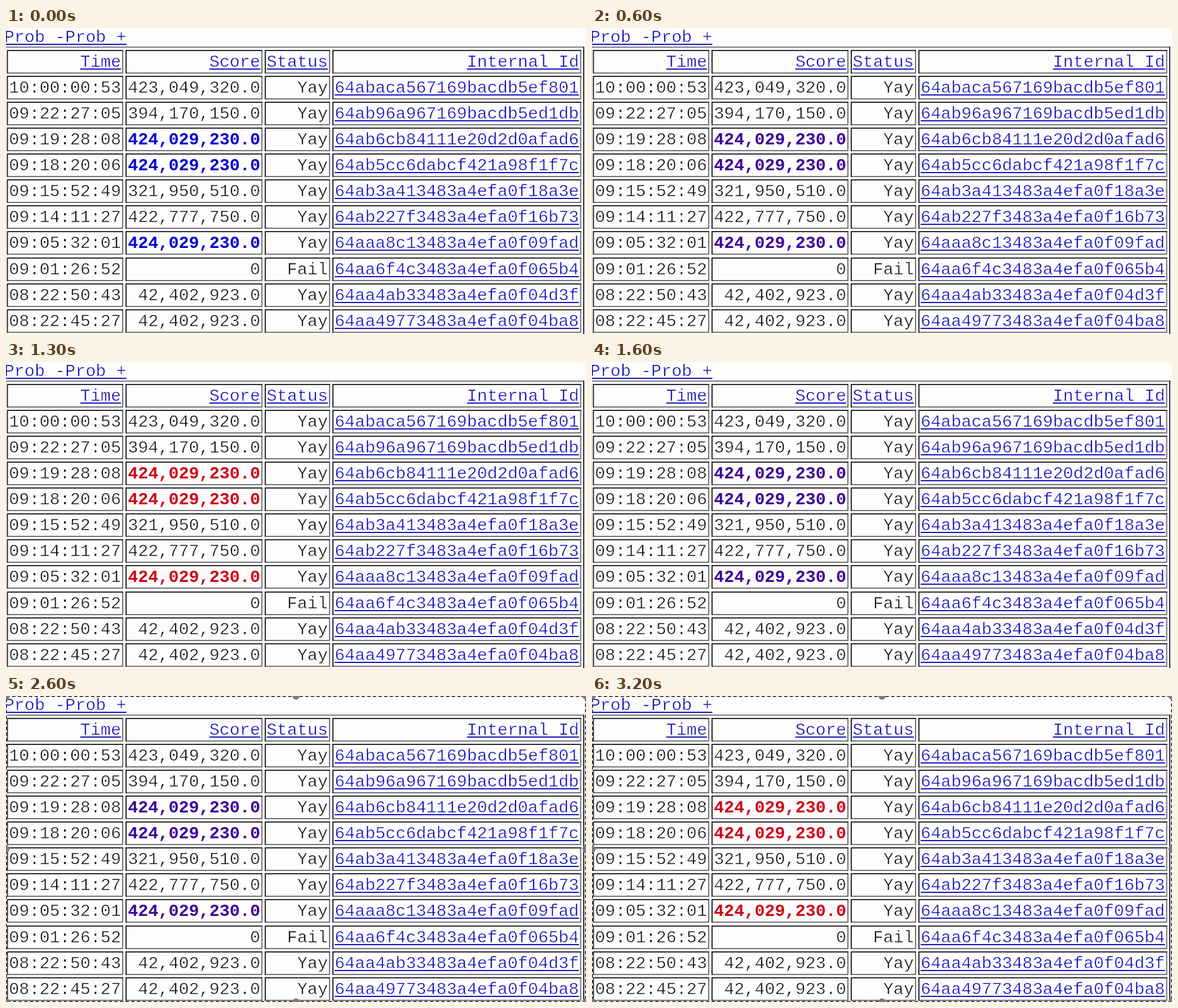
Write an HTML page that moves like this. It is 1029 by 544 pixels and loops after 3.3 s.

```html
<!DOCTYPE html>
<html lang="en">
<head>
<meta charset="utf-8">
<title>Score table</title>
<style>
html, body { margin: 0; width: 100%; height: 100%; overflow: hidden; background: #fdfdfc; }
svg { display: block; }
text { font: 30.1px "Liberation Mono", monospace; fill: #101014; white-space: pre; }
/* A background-coloured outline thins the regular weight */
text:not(.best) { stroke: #fdfdfc; stroke-width: 0.6px; }
.link { fill: #0c0cbc; }
.best { font-weight: bold; fill: var(--pulse); }
</style>
</head>
<body>
<svg id="stage" width="1029" height="544" viewBox="0 0 1029 544">
  <g id="table"></g>
  <g id="selection" visibility="hidden">
    <rect x="0.75" y="0.75" width="1027.5" height="542.5" fill="none" stroke="#fff" stroke-width="1.5"/>
    <rect x="0.75" y="0.75" width="1027.5" height="542.5" fill="none" stroke="#111" stroke-width="1.5" stroke-dasharray="6 4"/>
  </g>
</svg>
<script>
const ADVANCE = 18.063, PITCH = 46.12;
const BEST = "424,029,230.0";
const columns = [[1.5, 208], [212, 455], [459, 575], [579, 1020.5]];
const rows = [
  "Time|Score|Status|Internal Id",
  "10:00:00:53|423,049,320.0|Yay|64abaca567169bacdb5ef801",
  "09:22:27:05|394,170,150.0|Yay|64ab96a967169bacdb5ed1db",
  `09:19:28:08|${BEST}|Yay|64ab6cb84111e20d2d0afad6`,
  `09:18:20:06|${BEST}|Yay|64ab5cc6dabcf421a98f1f7c`,
  "09:15:52:49|321,950,510.0|Yay|64ab3a413483a4efa0f18a3e",
  "09:14:11:27|422,777,750.0|Yay|64ab227f3483a4efa0f16b73",
  `09:05:32:01|${BEST}|Yay|64aaa8c13483a4efa0f09fad`,
  "09:01:26:52|0|Fail|64aa6f4c3483a4efa0f065b4",
  "08:22:50:43|42,402,923.0|Yay|64aa4ab33483a4efa0f04d3f",
  "08:22:45:27|42,402,923.0|Yay|64aa49773483a4efa0f04ba8"
];
const table = document.getElementById("table");
const selection = document.getElementById("selection");

function add(parent, tag, attrs, content = "") {
  const node = document.createElementNS("http://www.w3.org/2000/svg", tag);
  for (const key in attrs) node.setAttribute(key, attrs[key]);
  node.textContent = content;
  parent.append(node);
}

function line(d, stroke) {
  add(table, "path", { d, stroke, fill: "none", "stroke-width": 2 });
}

function label(content, right, y, kind) {
  const left = right - content.length * ADVANCE;
  add(table, "text", { x: left, y, class: kind }, content);
  if (kind === "link") {
    add(table, "rect", { x: left, y: y + 3, width: right - left, height: 2, class: kind });
  }
}

label("Prob -Prob +", 213.5, 25, "link");
line("M0 34H1025", "#77777f");
line("M1025 33V544", "#222228");

rows.forEach((row, r) => {
  const top = Math.round(38.6 + r * PITCH), bottom = top + 42;
  row.split("|").forEach((content, c) => {
    const [left, right] = columns[c];
    line(`M${left + 1} ${bottom - 1}H${right - 1}V${top}`, "#707078");
    line(`M${left + 1} ${bottom}V${top + 1}H${right}`, "#222228");
    const kind = r === 0 || c === 3 ? "link" : content === BEST ? "best" : "";
    label(content, right - 4, top + 30, kind);
  });
});

for (const cx of [0, 514.5, 1029]) {
  for (const cy of [0, 272, 544]) {
    if (cx !== 514.5 || cy !== 272) add(selection, "circle", { cx, cy, r: 6.5, fill: "#7c7c80" });
  }
}

// Blue to red and back every 500 ms, sampled in 100 ms steps
const pulse = ["#0000d4", "#3e0099", "#d00016", "#d00016", "#3e0099"];

function draw(now) {
  const t = now % 3300;
  table.style.setProperty("--pulse", pulse[Math.floor(t / 100) % pulse.length]);
  selection.setAttribute("visibility", t >= 2300 ? "visible" : "hidden");
  requestAnimationFrame(() => draw(performance.now()));
}
draw(performance.now());
</script>
</body>
</html>
```
